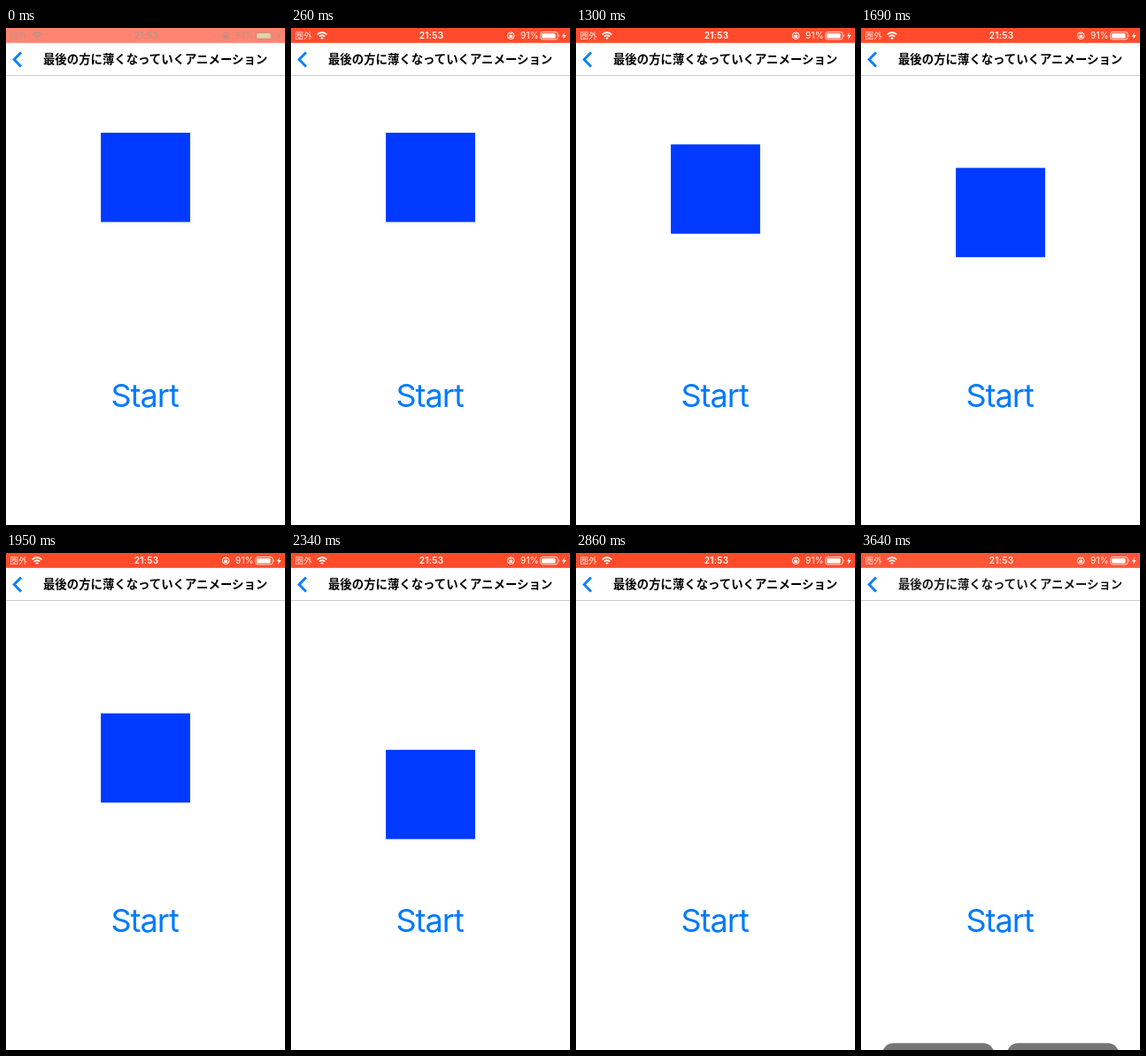
Recreate the animation shown at these times as an HTML page. Size 315 px wide and 560 px high, loop 3.77 s.

```html
<!DOCTYPE html>
<html lang="ja">
<head>
<meta charset="utf-8">
<title>Fade out at the end</title>
<style>
  html, body { margin: 0; width: 100%; height: 100%; overflow: hidden; background: #fff; }
  svg { display: block; width: 100vw; height: 100vh; }
  text { font-family: Inter, "Noto Sans CJK JP", "Noto Sans CJK", sans-serif; font-optical-sizing: none; }
  #status { fill: var(--ink); stroke: none; font-size: 10px; letter-spacing: .3px; }
  #status .line { fill: none; stroke: var(--ink); }
  #carrier { font-size: 9.6px; letter-spacing: 0; fill-opacity: .85; }
  #title { font: 700 13.4px "Noto Sans CJK JP", "Noto Sans CJK", sans-serif; text-anchor: middle; }
  #start { font-size: 36px; letter-spacing: -1px; text-anchor: middle; fill: #007aff; }
</style>
</head>
<body>
<svg id="stage" viewBox="0 0 315 560">
  <g id="screen">
    <rect x="-5" y="-5" width="325" height="570" fill="#fff"/>
    <rect id="bar" x="-5" y="-5" width="325" height="21.8"/>
    <g id="status">
      <text id="carrier" x="4.6" y="12.3">圏外</text>
      <g class="line" stroke-width="1.7">
        <path d="M29.6 7.4Q35 2.6 40.4 7.4"/>
        <path d="M31.7 9.7Q35 6.8 38.3 9.7"/>
      </g>
      <path d="M33.2 11.2Q35 9.7 36.8 11.2L35 13Z"/>
      <text x="158.5" y="12.3" font-weight="600" text-anchor="middle">21:53</text>
      <circle class="line" cx="248.2" cy="8.7" r="3.8"/>
      <rect x="246.3" y="8.2" width="3.8" height="2.8"/>
      <path class="line" stroke-width=".7" d="M247.1 8.4V7.4a1.1 1.1 0 0 1 2.2 0V8.4"/>
      <text x="259" y="12.3">91%</text>
      <rect class="line" x="281.8" y="4.5" width="19.2" height="8.4" rx="2" stroke-width=".8"/>
      <rect id="charge" x="283.2" y="5.9" width="15.4" height="5.6" rx=".8"/>
      <path d="M302 7.1q1.6 1.6 0 3.2Z"/>
      <path d="M309 4.7L305.8 9.4H307.9L307.2 12.9L310.6 7.9H308.3Z"/>
    </g>
    <rect x="-5" y="53.1" width="325" height=".9" fill="#c8c8ca"/>
    <path d="M17 27.4L9.2 35.5L17 43.6" fill="none" stroke="#0a7fff" stroke-width="2.9"/>
    <text id="title" x="168.6" y="39.8">最後の方に薄くなっていくアニメーション</text>
    <rect id="box" x="107.1" y="118" width="100.8" height="100.6" fill="#0039ff"/>
    <text id="start" x="156.6" y="427">Start</text>
  </g>
  <g id="panel" fill="#757577">
    <rect x="24" y="552.3" width="126.5" height="40" rx="12.5"/>
    <rect x="164.7" y="552.3" width="126.5" height="40" rx="12.5"/>
  </g>
</svg>
<script>
  const LOOP = 3770, TICK = 130;
  const TAP = 846, MOVE = 2000, DROP = 168, FADE = 200, RELEASE = 300, PANEL = 3640;
  const $ = id => document.getElementById(id);
  const clamp = v => Math.min(1, Math.max(0, v));

  // cubic-bezier(.42, 0, 1, 1), solved by bisection
  function easeIn(x) {
    let lo = 0, hi = 1;
    for (let i = 0; i < 24; i++) {
      const s = (lo + hi) / 2, r = 1 - s;
      if (1.26 * s * r * r + 3 * s * s * r + s ** 3 < x) lo = s;
      else hi = s;
    }
    return lo * lo * (3 - 2 * lo);
  }

  function barLook(t) {
    if (t < TICK) return ['#ff8572', '#c1907f', '#dcd4ae'];
    if (t < 2 * TICK) return ['#ff674d', '#f0c9c0', '#f4eddc'];
    if (t >= PANEL) return ['#ff5637', '#fff1ee', '#fff'];
    return ['#ff4b2b', '#fff', '#fff'];
  }

  function draw(t) {
    const [bar, ink, charge] = barLook(t);
    $('bar').style.fill = bar;
    $('status').style.setProperty('--ink', ink);
    $('charge').style.fill = charge;

    const end = TAP + MOVE;
    const y = DROP * easeIn(clamp((t - TAP) / MOVE));
    $('box').setAttribute('transform', `translate(0 ${y.toFixed(2)})`);
    $('box').style.opacity = clamp((end - t) / FADE);
    $('start').style.opacity = t < TAP ? 1 : 0.2 + 0.8 * clamp((t - TAP) / RELEASE);

    const open = t >= PANEL;
    $('panel').style.display = open ? '' : 'none';
    $('screen').style.filter = open ? 'blur(.5px)' : 'none';
    $('title').style.fill = open ? '#1a1a1a' : '#000';
  }

  let begin;
  function frame(now) {
    begin ??= now;
    const t = (now - begin) % LOOP;
    draw(Math.floor(t / TICK) * TICK);
    requestAnimationFrame(frame);
  }
  draw(0);
  requestAnimationFrame(frame);
</script>
</body>
</html>
```
